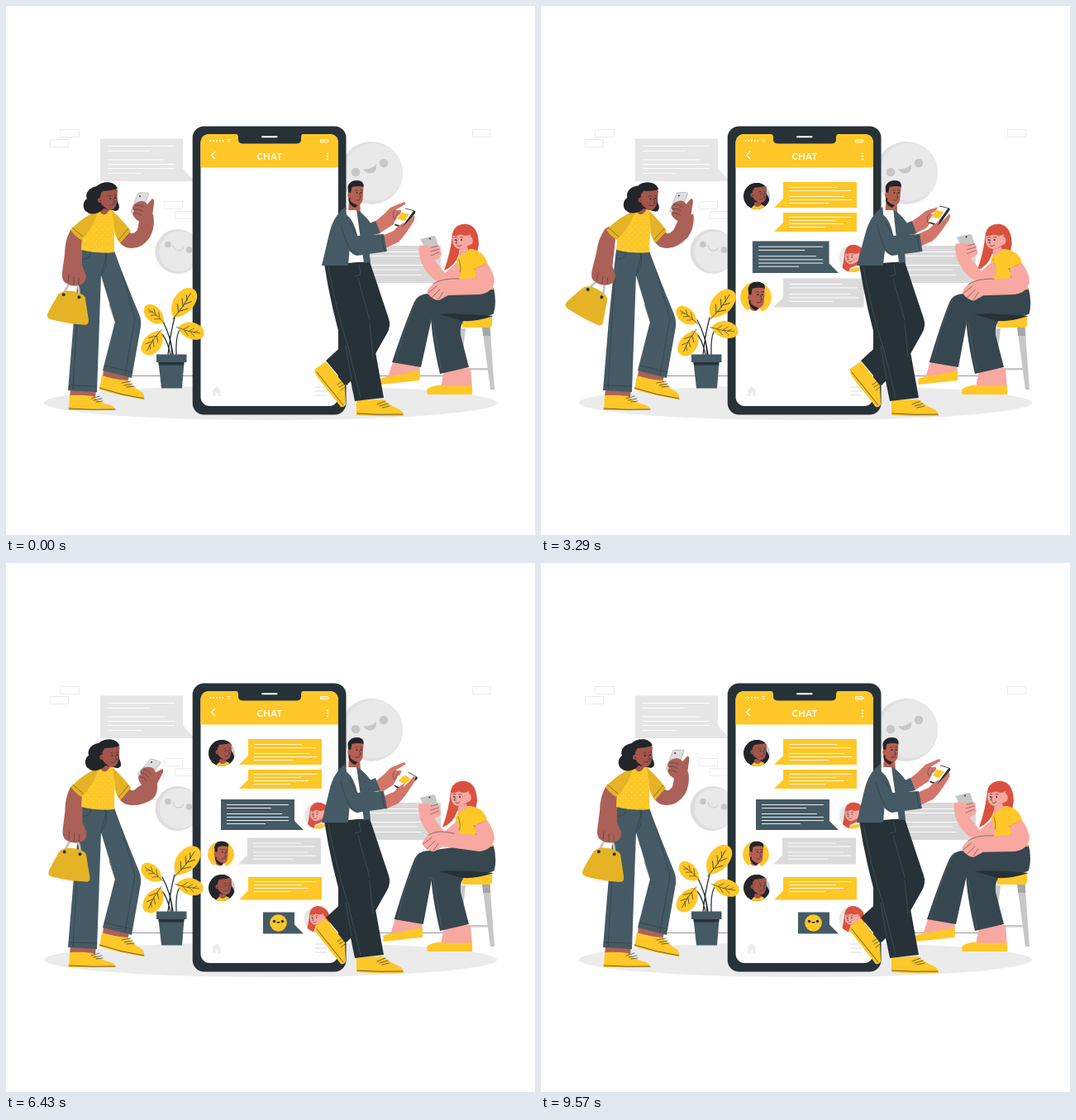
Animation, 640 px wide and 640 px high, one loop 9.64 s. Source, as an HTML page:

```html
<!DOCTYPE html>
<html lang="en">
<head>
<meta charset="utf-8">
<title>Chat</title>
<style>
html, body { margin: 0; height: 100%; overflow: hidden; background: #fff; }
svg { display: block; width: 100vw; height: 100vh; }
.y { fill: #ffc727; } .o { fill: #e5b325; } .d { fill: #263238; } .j { fill: #455a64; }
.p { fill: #37474f; } .h { fill: #22252a; } .w { fill: #fff; }
.g { fill: #e6e6e6; } .c { fill: #c7c7c7; }
.brown { fill: #ab6157; } .brown2 { fill: #a3554a; }
.tan { fill: #d3766a; } .tan2 { fill: #b65f50; }
.pink { fill: #f7a8a0; } .red { fill: #da523f; }
.l, .wl, .seam { fill: none; stroke-linecap: round; stroke-linejoin: round; }
.l { stroke: #263238; stroke-width: .7; }
.l.thin { stroke-width: .5; } .l.stem { stroke-width: 1.3; } .l.eye { stroke-width: 1.9; }
.seam { stroke: #55686f; stroke-width: .5; }
.wl { stroke: #fff; stroke-width: .9; stroke-linecap: butt; }
</style>
</head>
<body>
<svg viewBox="0 0 640 640">
<defs>
  <clipPath id="disc"><circle r="16"/></clipPath>
  <pattern id="dots" width="7" height="7" patternUnits="userSpaceOnUse">
    <path d="M1 1h.1M4.500 4.500h.1" stroke="#ffe28a" stroke-width="1.200" stroke-linecap="round"/>
  </pattern>
  <g id="curly">
    <path class="h" d="M9-16C2-23-10-21-14-16C-26-14-28-5-26-1C-33 4-30 14-26 15C-22 20-10 17-6 11L9 14Q16 12 11 3Z"/>
    <path class="brown2" d="M-9-12C-12 0-9 7-5 9Q0 14 5 12Q9 10 10 3L11-12Z"/>
    <path class="h" d="M11-13C7-24-11-23-15-11L-14 4L-10 2Q-11-6-7-10Q2-10 11-13Z"/>
    <circle class="brown2" cx="-10" cy="1" r="3"/>
    <path class="l" d="M0-4q2-1 3 0M7-5q2-1 3 0M6-1l2 5h-2M1 7q3 1 5-1M-11 1q1-1 2 1"/>
    <path class="l eye" d="M2-1h.1M8-2h.1"/>
  </g>
  <g id="short">
    <path class="tan2" d="M-9-10L-9 7Q-6 12-1 14Q6 14 8 7L9-10Z"/>
    <path class="h" d="M-9 1L-10-9Q-8-17 1-17Q10-17 9-9Q3-11-5-9L-7 1L-7 8Q-3 12 2 13L-1 16Q-7 14-9 8Z"/>
    <ellipse class="tan2" cx="-8" cy="1" rx="2.200" ry="3.500"/>
    <path class="l" d="M-1-5q2-1 3 0M5-5q2-1 3 0M4-1l2 5h-2M0 7q3 1 5-1"/>
    <path class="l eye" d="M1-2h.1M6-2h.1"/>
  </g>
  <g id="ginger">
    <path class="red" d="M-12-8C-10-19 0-21 6-20C17-18 20-6 20 4L18 15Q14 10 10 10L-4 16Q-8 30-22 36Q-14 14-12-8Z"/>
    <path class="pink" d="M-11-7Q-13 3-9 7Q-5 12 2 9L11 4L10-8Z"/>
    <path class="red" d="M-12-7C-9-21 12-22 17-8Q20 2 17 13L12 8Q14-1 10-8Q4-4-2-8Q-8-4-12-7Z"/>
    <ellipse class="pink" cx="10" cy="0" rx="2.800" ry="4.200"/>
    <path class="l" d="M-9-4q2-1 3 0M-2-4q2-1 3 0M-6-1l-2 4h2M-6 6q3 2 5-1"/>
    <path class="l eye" d="M-8-1h.1M-1-1h.1"/>
  </g>
  <g id="leaf">
    <path class="y" d="M0 0C-14-7-15-26-6-36Q4-43 10-33C15-20 10-7 0 0Z"/>
    <path class="l" d="M0 2Q3-15 1-33M1-8l-6-7M2-10l6-7M2-16l-6-7M2-19l5-7M2-24l-4-5"/>
  </g>
</defs>

<!-- background -->
<ellipse cx="320" cy="480" rx="274" ry="21" fill="#ebebeb"/>
<path class="l thin" d="M140 447.500H227M410 447.500H530"/>
<path fill="none" stroke="#ececec" d="M53.500 161.500h22v9h-22zM65.500 149.500h23v9h-23zM564.500 149.500h22v9h-22zM191.500 236.500h22v9h-22zM204.500 248.500h22v9h-22zM67 384.500h14"/>
<path class="g" d="M114 160.500h100v36l14 15.500H114z"/>
<path class="wl" d="M123 169.500h81M123 175.500h51M123 186h69M123 191.500h81M123 196.500h81M123 202.500h41"/>
<circle cx="207.500" cy="297" r="27" fill="#dedede"/><circle cx="210" cy="297" r="24.500" fill="#e9e9e9"/>
<g class="c"><circle cx="196" cy="288.500" r="3.800"/><circle cx="221.500" cy="295" r="3.800"/></g>
<path fill="none" stroke="#c7c7c7" d="M202 289q2 8 7 7q4 0 6-4"/>
<circle cx="442" cy="202" r="38" fill="#e0e0e0"/><circle cx="445" cy="201" r="35" fill="#e9e9e9"/>
<g class="c"><circle cx="423" cy="201" r="5.300"/><circle cx="457" cy="190" r="5.300"/><path d="M432 197q8 2 16-5q1 8-5 10q-7 2-11-5z"/></g>
<path fill="#d9d9d9" d="M440 290h86v45h-86z"/>
<path class="wl" d="M440 297.500h77M440 302.500h60M440 313.500h77M440 319h58M440 325.500h62"/>

<!-- phone -->
<rect class="d" x="225.700" y="145.500" width="185.800" height="349" rx="14"/>
<rect class="w" x="235.500" y="155" width="166.500" height="329" rx="11"/>
<path class="y" d="M235.500 195.500V166q0-11 11-11H391q11 0 11 11v29.500z"/>
<path class="d" d="M276 154.500q5 0 5 4v3q0 5 6 5H351q6 0 6-5v-3q0-4 5-4z"/>
<path stroke="#fff" stroke-width="2" stroke-linecap="round" d="M310 158.300h17.500"/>
<path stroke="#fff" stroke-width="2" stroke-linecap="round" stroke-dasharray="0 3.700" d="M247.500 163h16"/>
<path class="wl" d="M267 162q2.500-1.500 5 0M268 164h3M380.500 161.500h8.500v3.500h-8.500zM381 163.300h6.500M390 162v2.500"/>
<path fill="none" stroke="#fff" stroke-width="1.300" d="M253 176l-4.500 4.500l4.500 4.500"/>
<g class="w"><circle cx="389" cy="178.500" r="1.100"/><circle cx="389" cy="182" r="1.100"/><circle cx="389" cy="185.500" r="1.100"/></g>
<text x="319" y="186" text-anchor="middle" font-family="Lato, sans-serif" font-weight="700" font-size="11" letter-spacing=".5" class="w">CHAT</text>
<path fill="#ebebeb" d="M249 466l6-6l6 6h-1.500v6h-3v-4h-3v4h-3v-6z"/>
<path stroke="#e6e6e6" stroke-width="1.500" d="M374 461h14M374 466h14M374 471h14"/>
<g id="chat"></g>

<!-- plant -->
<path class="l stem" d="M196 422Q199 395 204 377M201 422Q200 400 189 380M199 422Q193 395 183 394M206 422Q205 393 213 390M198 400Q200 410 202 421"/>
<g id="leafTop"><use href="#leaf" transform="translate(203 377) rotate(33) scale(1.050 1.080)"/></g>
<g id="leafLeft"><use href="#leaf" transform="translate(191 383) rotate(-51) scale(.78 .77)"/></g>
<g id="leafRight"><use href="#leaf" transform="translate(208 389) rotate(103) scale(.85 .84)"/></g>
<g id="leafLow"><use href="#leaf" transform="translate(187 393) rotate(213) scale(.92 .88)"/></g>
<path class="j" d="M182 421.500h36.500v9.500H182zM184.500 431h31l-2.500 31.500h-25z"/><path class="d" d="M184.500 431h31l-.3 3.500h-30.300z"/>

<!-- standing woman -->
<path class="brown" d="M78 464h31l-1 9H77zM118 440l31 8l-2 7l-30-7z"/>
<path class="y" d="M77 471q14-1 28 1q8 8 22 11q5 2 5 6H76zM116 447q14 5 31 6q8 9 17 14q4 3 3 9q-28-4-54-12z"/>
<path class="l" d="M103 475l10-3M106 477l10-2M109 479l8-1M140 456l11-2M143 459l10-2M146 461l9-1M76 487q28 2 56 1M113 462q27 9 54 13"/>
<path class="j" d="M91 294L131 296Q140 322 161 373Q164 380 163 388L152 450L117 441L132 382L115 326L110 467L75 465L82 380Q87 330 91 294Z"/>
<path class="l thin" d="M115 326L122 300M92 306q10 2 11-9M120 299q4 12-2 23M89 330L81 464M132 382L125 361M140 322L156 378L144 446M76 459l34 1M119 435l34 8"/>
<g id="bagArm">
  <g id="bag">
    <path fill="none" stroke="#c4c4c4" stroke-width="2.800" d="M-9 21Q-5 4 0 4Q8 4 10 21"/>
    <path class="o" d="M-10 17Q0 13 13 17Q17 18 18 22L26 47Q27 53 21 53Q0 55-20 53Q-26 52-24 45Q-20 33-15 21Z"/>
    <circle class="d" cx="-9" cy="21" r="2"/><circle class="d" cx="10" cy="21" r="2"/>
  </g>
  <path class="brown" d="M78 271Q71 284 71 300L68 322Q67 332 72 335Q80 340 87 338Q97 337 97 326L92 314L92 283Q91 270 82 268Z"/>
  <path class="l thin" d="M75 334l1-9M82 337v-9M88 337v-8"/>
</g>
<g id="torso">
  <path class="brown" id="phoneArm"/>
  <path class="y" d="M111 248L126 246Q136 252 131 262L131 298Q110 300 91 295L92 275Q100 255 111 248Z"/>
  <path fill="url(#dots)" d="M111 248L126 246Q136 252 131 262L131 298Q110 300 91 295L92 275Q100 255 111 248Z"/>
  <path class="o" d="M112 247Q93 255 78 271Q84 279 91 283Q105 270 112 247ZM128 247Q142 260 151 272L138 287Q130 277 131 266Z"/>
  <path class="l thin" d="M80 268l13 11M148 269l-12 14"/>
  <path class="brown2" d="M114 240l-1 8q6 9 12-1l-2-6z"/>
</g>
<g id="curlyHead"><use href="#curly" x="124" y="234"/></g>
<g id="selfie">
  <path class="c" d="M159 226.500q1-1.500 13-1q1 0 1 2l-7 21l-14 2q-2 0-1-2z"/><path fill="#dedede" d="M160 227l12-1l-7 21l-13 2z"/>
  <circle class="d" cx="162" cy="230" r="1"/>
  <path class="brown" d="M177 233q3 1 2 6l-2 15l-3 14l-14-8q-7-5-7-9l2-3q-4-4 0-7q1-3 5-4q7-3 11 3z"/>
  <path class="l thin" d="M155 241q6-1 11 2M154 246q6-1 11 2M155 251q5-1 9 2"/>
</g>

<!-- stool and sitting woman -->
<path class="c" d="M576 388h9.500l5.500 76h-5zM549 390h7l-6 53h-5zM556 438h28v2.500h-28z"/><path fill="#a6a6a6" d="M576 388h9.500l.8 11h-9z"/>
<path class="y" d="M552 375h36v10q0 4-4 4h-32z"/>
<g id="gingerLeg">
  <path class="pink" d="M469 428l31 6l1 10l-40 8z"/>
  <path class="y" d="M453 451q10-4 18-4l29-6q2 8 0 12l-47 5z"/>
  <path class="p" d="M548 343L590 341Q594 358 590 372Q584 377 556 376L515 378L502 437L467 431Q483 383 494 358Q499 348 513 348Z"/>
  <path class="seam" d="M500 350q-17 32-28 79"/>
</g>
<path class="pink" d="M530 440l32-2l2 24h-38z"/>
<path class="y" d="M510 463q10-5 18-4q18 2 35 0q2 6 1 11h-54q-2-4 0-7z"/>
<path class="p" d="M514 375L558 374Q548 386 550 398L560 437L525 445Q515 402 514 375Z"/>
<path class="d" d="M524 373Q540 371 590 375Q558 385 545 379Z"/>
<path class="seam" d="M512 380l5 3l10 58"/>
<g id="gingerHead"><use href="#ginger" x="552" y="284"/></g>
<g id="gingerBody">
  <path class="pink" d="M548 295l10-4l3 9l-13 5z"/>
  <path class="y" d="M547 303Q555 300 561 294Q575 294 582 311L580 317L590 343L548 344Q540 322 547 303Z"/>
  <path class="l thin" d="M548 307q4 12 0 18M567 318l14-6M567 318q4 6 2 11"/>
</g>
<g id="gingerPhone">
  <path class="pink" d="M501 295L501 306Q508 326 523 334Q540 340 550 326L546 310L531 323L518 307Z"/>
  <path class="c" d="M501 282l16-4q2 0 3 2l6 21l-15-1z"/><circle class="d" cx="513" cy="281.500" r="1"/>
  <path class="pink" d="M500 290l9-1l7 2l7-1q3 1 2 5l2 5q-1 4-6 6l-8 6l-10-5q-5-9-3-17z"/>
  <path class="l thin" d="M515 292l8-2M514 297l10-3M514 302l10-4"/>
</g>
<path id="gingerArm" class="pink"/>
<path id="gingerFingers" class="l thin"/>
<path class="y" d="M565 296q12 0 17 14l-15 8z"/>

<!-- leaning man -->
<path class="y" d="M387 430q-4 3-13 9q-1 4 2 9l29 37q4 1 6-3l-1-23z"/><path class="l" d="M376 443l32 40M401 458l8-5M403 461l7-4M405 465l5-4"/>
<path class="y" d="M424 477l32-1q8 7 20 12q5 3 5 8q-30 1-57-1z"/><path class="l" d="M449 482l10-4M452 484l10-3M455 486l9-2M425 493q28 2 55 1"/>
<path class="d" d="M386 312L440 309L463 378Q466 387 461 396L444 426L412 459L387 429L411 407L417 350Z"/>
<path class="d" d="M385 312L425 311L440 380L457 474L422 478L411 425Q393 365 385 312Z"/>
<path class="seam" d="M390 316Q400 370 414 413L429 474M427 313l2 12l-7 2M440 380l-14-50M444 424l-4-40M411 411l7 40"/>
<g id="manBody">
  <path class="tan2" d="M415 233l13 4l1 14l-15 1z"/>
  <path class="w" d="M411 247L426 247L438 309L412 311Z"/>
  <path class="j" d="M424 246Q434 252 442 264L437 275L441 310L433 311Z"/><path class="d" d="M427 258q11 7 15 19l-9 3z"/>
  <g id="farHand"><path class="tan" d="M446 261Q458 252 465 244Q474 240 482 237Q485 239 481 241L471 247L478 247Q479 251 474 254L469 264L452 275Z"/><path class="l thin" d="M471 247q-5 4-2 10M474 250l-4 8"/></g>
  <path class="j" d="M426 250Q432 256 435 265L447 260L453 275L431 280Z"/>
  <g id="manPhone">
    <path class="d" d="M483 244.500l11 3q2 1 1 3l-13 18q-1 1-3 .5l-9-4z"/>
    <path class="w" d="M482 245l11 3l-13.500 18.500l-10.500-3.500z"/><path class="y" d="M479 249.500l9 2.500l-6 8l-8.500-2.500z"/>
  </g>
  <g id="nearHand"><path class="tan" d="M455 278L469 272Q476 264 482 262L479 268L488 259L493 253Q496 255 493 261L487 270Q480 281 474 286L459 293Z"/></g>
  <path class="j" d="M411 243Q396 253 391 276L382 314L414 314L416 290L413 262Z"/>
  <path class="j" d="M407 250Q420 254 425 278L457 276L461 297L424 302Q415 299 411 288Z"/>
  <path class="l thin" d="M405 265q6 21 12 30q4 6 10 6M425 278l-9-15M454 277l4 20"/>
  <use href="#short" x="423.500" y="228"/>
</g>
</svg>
<script>
const LOOP = 9640, poseTimes = [0, 1210, 2500, 4070, 6430, 8210];
const byId = id => document.getElementById(id);
const move = (id, transform) => byId(id).setAttribute('transform', transform);
const clamp = x => Math.min(1, Math.max(0, x));
const smooth = x => (x = clamp(x), x * x * (3 - 2 * x));

// Periodic cubic curve through one value per pose time
function curve(...values) {
  const n = values.length;
  const at = i => poseTimes[(i + n) % n] + LOOP * Math.floor(i / n);
  const value = i => values[(i + n) % n];
  const slope = i => (value(i + 1) - value(i - 1)) / (at(i + 1) - at(i - 1));
  return t => {
    let i = n - 1;
    while (t < poseTimes[i]) i--;
    const span = at(i + 1) - at(i), u = (t - at(i)) / span, v = 1 - u;
    return value(i) * v * v * (1 + 2 * u) + value(i + 1) * u * u * (3 - 2 * u)
      + span * u * v * (slope(i) * v - slope(i + 1) * u);
  };
}
const swing = curve(.25, .5, .82, .98, .18, .04);
const sway = curve(0, .35, .8, 1, .9, .15);
const headX = curve(0, 2, 4.5, 6, 2, .3);
const selfieX = curve(0, 1, 2, 6, 4, 2), selfieY = curve(0, -3, -4, 4, 12, 4);
const selfieTurn = curve(0, -4, -5, 8, 20, 12);
const manX = curve(0, 1.3, 2.7, 2.7, 0, -.6);
const manPhoneX = curve(0, -3, -2.5, -2.5, 1, 1), manPhoneY = curve(0, -3, -5, 0, 8, 2);
const manPhoneTurn = curve(0, 0, -3, 0, 14, 6);
const gingerX = curve(0, -1, -2.5, -2, -2, -2.5);
const gingerPhoneX = curve(0, 1.5, 1.5, 1.5, -.5, 1.5), gingerPhoneY = curve(0, -1, -3, -1, 2, -1);
const typing = curve(0, 0, 0, 0, 1, 1);

const avatars = {
  curly: '<circle r="16" fill="#c9cccf"/><path class="h" d="M-7-5Q-14 6-12 18H16Q19 5 10-5Z"/><path class="y" d="M-8 17Q-3 8 2 10Q9 9 12 17Z"/><path class="brown2" d="M-3 5h8v6q-4 4-8 0z"/><use href="#curly" transform="translate(3 -2) scale(.82)"/>',
  short: '<circle r="16" class="y"/><path class="w" d="M-10 17Q-7 8 3 10L8 17Z"/><path class="tan2" d="M-6 5h9v7q-4 4-9 0z"/><use href="#short" transform="translate(1 -1) scale(.9)"/>',
  ginger: '<circle r="16" fill="#e6e6e6"/><path class="y" d="M-6 17Q0 8 12 12V17Z"/><use href="#ginger" transform="translate(0 -1) scale(.76)"/>'
};
const lineRows = {
  5: [[6.500, 58], [10.500, 75], [17.500, 67], [21.500, 76], [25.500, 48]],
  4: [[5.500, 76], [9.500, 57], [13.500, 66], [17.500, 44]],
  6: [[6.500, 75], [10.500, 54], [17.500, 67], [21.500, 75], [25.500, 75], [29.500, 47]]
};
const messages = [
  { start: 0, x: 293, y: 213, w: 89, h: 31, rows: 5, who: 'curly', ax: 261, ay: 230 },
  { start: 930, x: 293, y: 250, w: 89, h: 23, rows: 4 },
  { start: 1800, x: 260, y: 286, w: 89, h: 37, rows: 6, who: 'ginger', ax: 377, ay: 305.5, right: true },
  { start: 2220, x: 292, y: 332.500, w: 89, h: 32, rows: 5, who: 'short', ax: 260, ay: 352.5, fill: '#dbdbdb' },
  { start: 3370, x: 293, y: 380, w: 89, h: 27.500, rows: 4, who: 'curly', ax: 261, ay: 393 },
  { start: 4130, x: 311, y: 422.500, w: 38, h: 26, who: 'ginger', ax: 376.5, ay: 431, right: true }
];
const smiley = '<circle class="y" cx="329.500" cy="435.500" r="10.300"/><g class="d"><circle cx="324.500" cy="433.500" r="1.800"/><circle cx="334.500" cy="433.500" r="1.800"/><path d="M327 434h5q-2.500 4-5 0z"/></g>';

byId('chat').innerHTML = messages.map(({ x, y, w, h, rows, right, fill, who }, i) => {
  const shape = right ? `M${x} ${y}h${w}v${h - 11}l11 11H${x}z` : `M${x} ${y}h${w}v${h}H${x - 11}l11-11z`;
  const lines = (lineRows[rows] || []).map(([dy, len]) => `M${x + 7} ${y + dy}h${len}`).join('');
  const face = who ? `<g id="avatar${i}"><g clip-path="url(#disc)">${avatars[who]}</g></g>` : '';
  return `<g id="bubble${i}"><path d="${shape}" fill="${fill || (right ? '#455a64' : '#ffc727')}"/>` +
    `<path class="wl" d="${lines}"/>${rows ? '' : smiley}</g>${face}`;
}).join('');

// Grow past full size, then settle
const pop = (t, rise, settle, peak) =>
  t < rise ? peak * smooth(t / rise) : 1 + (peak - 1) * (1 - smooth((t - rise) / settle));

function drawChat(t) {
  messages.forEach(({ start, x, y, w, h, right, who, ax, ay }, i) => {
    const age = t - start, tipX = right ? x + w + 11 : x - 11, tipY = y + h;
    move('bubble' + i, `translate(${tipX} ${tipY}) scale(${pop(age, 700, 1300, 1.12)}) translate(${-tipX} ${-tipY})`);
    if (who) move('avatar' + i, `translate(${ax} ${ay}) scale(${pop(age - 250, 750, 700, 1.19)})`);
  });
}

const lean = (x, y, amount) => `translate(${x} ${y}) skewX(${-Math.atan(amount) * 180 / Math.PI}) translate(${-x} ${-y})`;

function drawPeople(t) {
  const s = swing(t), arm = 9 * (s - .25), head = headX(t);
  move('bagArm', `rotate(${arm} 88 265)`);
  move('bag', `translate(82 330) rotate(${7 + 5 * s + 18 * s * s - arm})`);
  move('torso', lean(110, 297, head * .008));
  move('curlyHead', `translate(${head} 0) rotate(${head * .6} 120 248)`);
  const hx = selfieX(t), hy = selfieY(t);
  move('selfie', `translate(${hx} ${hy}) rotate(${selfieTurn(t)} 170 258)`);
  byId('phoneArm').setAttribute('d', `M148 272Q152 279 159 271L${162 + hx} ${255 + hy}L${178 + hx} ${252 + hy}` +
    `Q${181 + hx} ${267 + hy} ${174 + hx * .7} ${280 + hy * .5}Q164 294 151 293Q141 292 137 285Z`);

  const px = manPhoneX(t), py = manPhoneY(t), held = smooth((t - 150) / 900) * (1 - smooth((t - 4700) / 1000));
  move('manBody', lean(412, 311, manX(t) / 84));
  move('farHand', `translate(${-4 * held} ${4 * held + py * .5}) rotate(${5 * held} 450 268)`);
  move('manPhone', `translate(${px} ${py}) rotate(${manPhoneTurn(t)} 483 257)`);
  move('nearHand', `translate(${px * .5} ${py * .6})`);

  move('gingerHead', `translate(${gingerX(t)} 0)`);
  move('gingerBody', lean(570, 343, gingerX(t) * .012));
  move('gingerLeg', lean(500, 350, -.036 * sway(t)));
  move('gingerPhone', `translate(${gingerPhoneX(t)} ${gingerPhoneY(t)})`);
  const x = -6 * typing(t), y = -7 * typing(t);
  byId('gingerArm').setAttribute('d', `M582 311Q591 324 591 334Q588 347 573 349L${535 + x} ${350 + y}L${524 + x} ${356 + y}` +
    `Q${518 + x} ${357 + y} ${510 + x} ${348 + y}Q${508 + x} ${344 + y} ${517 + x} ${336 + y}Q${526 + x} ${329 + y} ${546 + x} ${330 + y * .4}L569 329L567 318Z`);
  byId('gingerFingers').setAttribute('d', `M${511 + x} ${347 + y}l10-8M${515 + x} ${353 + y}l10-10M${523 + x} ${355 + y}l6-9M${517 + x} ${336 + y}Q${528 + x} ${329 + y} ${548 + x} ${330 + y * .4}`);
}

function drawPlant(t) {
  const s = sway(t);
  move('leafTop', `rotate(${4 * s} 200 422)`);
  move('leafLeft', `rotate(${-4 * s} 200 422)`);
  move('leafRight', `rotate(${-5 * s} 206 410)`);
  move('leafLow', `rotate(${-5 * s} 186 393)`);
}

function frame(now) {
  const t = now % LOOP;
  drawChat(t);
  drawPeople(t);
  drawPlant(t);
  requestAnimationFrame(frame);
}
requestAnimationFrame(frame);
</script>
</body>
</html>
```
